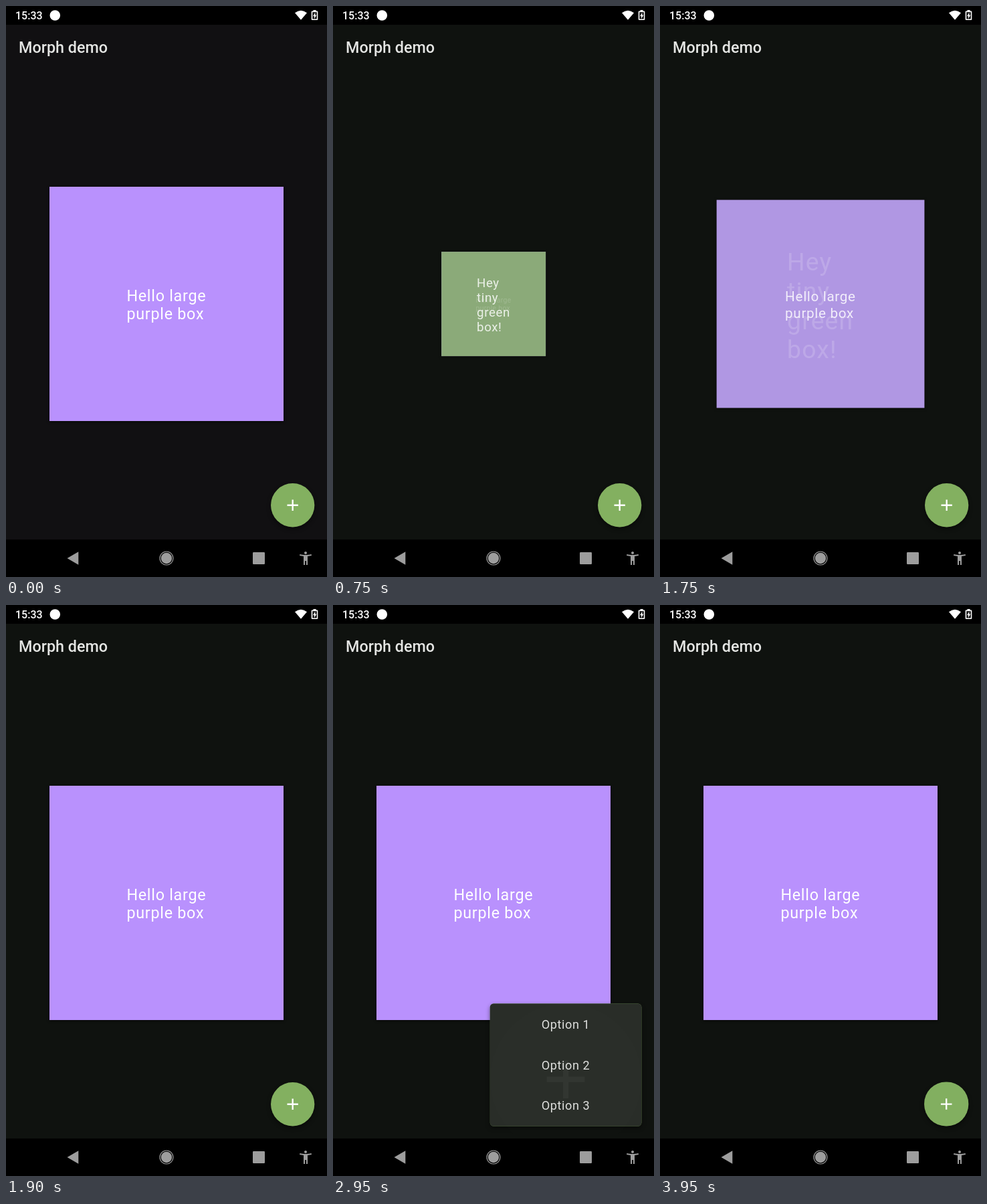
An HTML page that plays this animation: 480x853 px, repeating every 4 s.

```html
<!DOCTYPE html>
<html lang="en">
<head>
<meta charset="utf-8">
<title>Morph demo</title>
<style>
  html, body { margin: 0; width: 100%; height: 100%; overflow: hidden; background: #000; }
  svg { display: block; width: 100vw; height: 100vh; }
  text { font-family: Roboto, sans-serif; fill: #fff; }
  .body { letter-spacing: .03125em; }
  #box { filter: drop-shadow(0 1px 2px rgba(0, 0, 0, .6)); }
  #fab { filter: drop-shadow(0 3px 3px rgba(0, 0, 0, .45)); }
</style>
</head>
<body>
<svg viewBox="0 0 480 853">
  <defs>
    <radialGradient id="touch">
      <stop offset="0" stop-color="#fff" stop-opacity=".66"/>
      <stop offset=".7" stop-color="#fff" stop-opacity=".7"/>
      <stop offset=".77" stop-color="#fff" stop-opacity=".35"/>
      <stop offset=".92" stop-color="#fff" stop-opacity=".2"/>
      <stop offset="1" stop-color="#fff" stop-opacity="0"/>
    </radialGradient>
  </defs>

  <rect id="page" width="480" height="853"/>
  <text x="19" y="70" font-size="23.33" font-weight="500" style="fill:#e4e5e3">Morph demo</text>

  <g id="box">
    <rect class="first"/><rect class="second"/>
    <g class="first body" font-size="23.33">
      <text x="115.4" y="170.8">Hello large</text>
      <text x="115.4" y="198.1">purple box</text>
    </g>
    <g class="second body" font-size="14">
      <text x="39.6" y="39.7">Hey</text>
      <text x="39.6" y="56.1">tiny</text>
      <text x="39.6" y="72.5">green</text>
      <text x="39.6" y="88.9">box!</text>
    </g>
  </g>

  <g id="fab">
    <rect class="first"/><rect class="second"/>
    <g class="first">
      <circle id="ripple" cx="32.67" cy="32.67" r="32.67" fill="#fff"/>
      <path d="M24.5 32.67h16.34M32.67 24.5v16.34" stroke="#fff" stroke-width="2.33"/>
    </g>
    <g class="second body" font-size="18.67">
      <text x="79.3" y="38.7" style="fill:#e6e7e5">Option 1</text>
      <text x="79.3" y="101.2" style="fill:#e6e7e5">Option 2</text>
      <text x="79.3" y="163.7" style="fill:#e6e7e5">Option 3</text>
    </g>
  </g>

  <circle id="pointer" r="17" fill="url(#touch)"/>

  <g id="status">
    <rect width="480" height="28"/>
    <text x="14" y="20" font-size="16" font-weight="500">15:33</text>
    <g fill="#fff">
      <circle cx="73.3" cy="14" r="7.8"/>
      <path d="M432 10.2Q441 3.2 450 10.2L441 20.8Z"/>
      <path d="M459.5 7.6v-1.5h4v1.5h1.6q1.2 0 1.2 1.2v11q0 1.2-1.2 1.2h-7.2q-1.2 0-1.2-1.2v-11q0-1.2 1.2-1.2z"/>
    </g>
    <rect x="458.3" y="9.2" width="6.4" height="10.2"/>
    <path d="M462.4 9.6l-3.4 5.6h2v4l3.3-5.6h-1.9z" fill="#fff"/>
  </g>

  <g id="navigation" fill="#9d9d9d">
    <rect y="797" width="480" height="56" fill="#000"/>
    <path d="M91.5 825L108.3 815.3V834.7Z"/>
    <circle cx="240" cy="825" r="8.2"/>
    <circle cx="240" cy="825" r="10" fill="none" stroke="#9d9d9d" stroke-width="1.2"/>
    <rect x="369" y="816" width="18" height="18" rx="1.2"/>
    <path transform="translate(436 813)" d="M20.5 6c-2.61.7-5.67 1-8.5 1s-5.89-.3-8.5-1L3 8c1.86.5 4 .83 6 1v13h2v-6h2v6h2V9c2-.17 4.14-.5 6-1zM12 6c1.1 0 2-.9 2-2s-.9-2-2-2-2 .9-2 2 .9 2 2 2z"/>
  </g>
</svg>

<script>
const LOOP = 4000, STEP = 50;
const GREEN = '#83b060', PURPLE = '#b991fd', MENU = '#262826';

const byId = id => document.getElementById(id);
const lerp = (a, b, p) => a + (b - a) * p;
const clamp = v => Math.min(1, Math.max(0, v));
const progress = (t, start, end) => clamp((t - start) / (end - start));

function setAttrs(el, attrs) {
  for (const key in attrs) el.setAttribute(key, attrs[key]);
}

// Standard material curve, cubic-bezier(.4, 0, .2, 1)
function ease(x) {
  if (x <= 0 || x >= 1) return clamp(x);
  const curve = (a, b, u) => 3 * a * u * (1 - u) ** 2 + 3 * b * u * u * (1 - u) + u ** 3;
  let lo = 0, hi = 1;
  for (let i = 0; i < 24; i++) {
    const mid = (lo + hi) / 2;
    if (curve(.4, .2, mid) < x) lo = mid; else hi = mid;
  }
  return curve(0, 1, lo);
}

// Container that grows from one shape to another while the second fades in over the first
function makeMorph(id, from, to) {
  const root = byId(id);
  const states = [['first', from], ['second', to]].map(([name, shape]) => ({
    shape,
    rect: root.querySelector('rect.' + name),
    content: root.querySelector('g.' + name)
  }));
  return p => {
    const [x, y, w, h, r] = ['x', 'y', 'w', 'h', 'r'].map(k => lerp(from[k], to[k], p));
    states.forEach(({ shape, rect, content }, i) => {
      const opacity = i ? p : 1;
      setAttrs(rect, { x, y, width: w, height: h, rx: r, fill: shape.fill, opacity });
      setAttrs(content, {
        transform: `translate(${x} ${y}) scale(${w / shape.w})`,
        opacity: i ? p : 1 - p
      });
    });
  };
}

const morphBox = makeMorph('box',
  { x: 65, y: 270, w: 350, h: 350, r: 0, fill: PURPLE },
  { x: 181.8, y: 386.8, w: 116.67, h: 116.67, r: 0, fill: GREEN });

const morphFab = makeMorph('fab',
  { x: 396, y: 713.1, w: 65.33, h: 65.33, r: 32.67, fill: GREEN },
  { x: 228, y: 590.4, w: 233.33, h: 188, r: 4, fill: MENU });

const touches = [
  { start: 500, end: 600, x: 231, y: 470 },
  { start: 1500, end: 1600, x: 231, y: 470 },
  { start: 2450, end: 2700, x: 427, y: 748 },
  { start: 3550, end: 3650, x: 302, y: 621 }
];

function render(t) {
  byId('page').setAttribute('fill', t < 500 ? '#111012' : '#0f120f');

  morphBox(ease(progress(t, 585, 885)) - ease(progress(t, 1585, 1885)));
  morphFab(ease(progress(t, 2800, 3000)) - ease(progress(t, 3675, 3980)));

  const ripple = t < 3000 ? .13 * progress(t, 2450, 2600) : 0;
  byId('ripple').setAttribute('opacity', ripple);

  const touch = touches.find(({ start, end }) => t >= start && t < end);
  setAttrs(byId('pointer'), touch
    ? { cx: touch.x, cy: touch.y, opacity: 1 }
    : { opacity: 0 });
}

function tick() {
  const t = performance.now() % LOOP;
  render(Math.floor(t / STEP) * STEP);
  requestAnimationFrame(tick);
}
tick();
</script>
</body>
</html>
```
